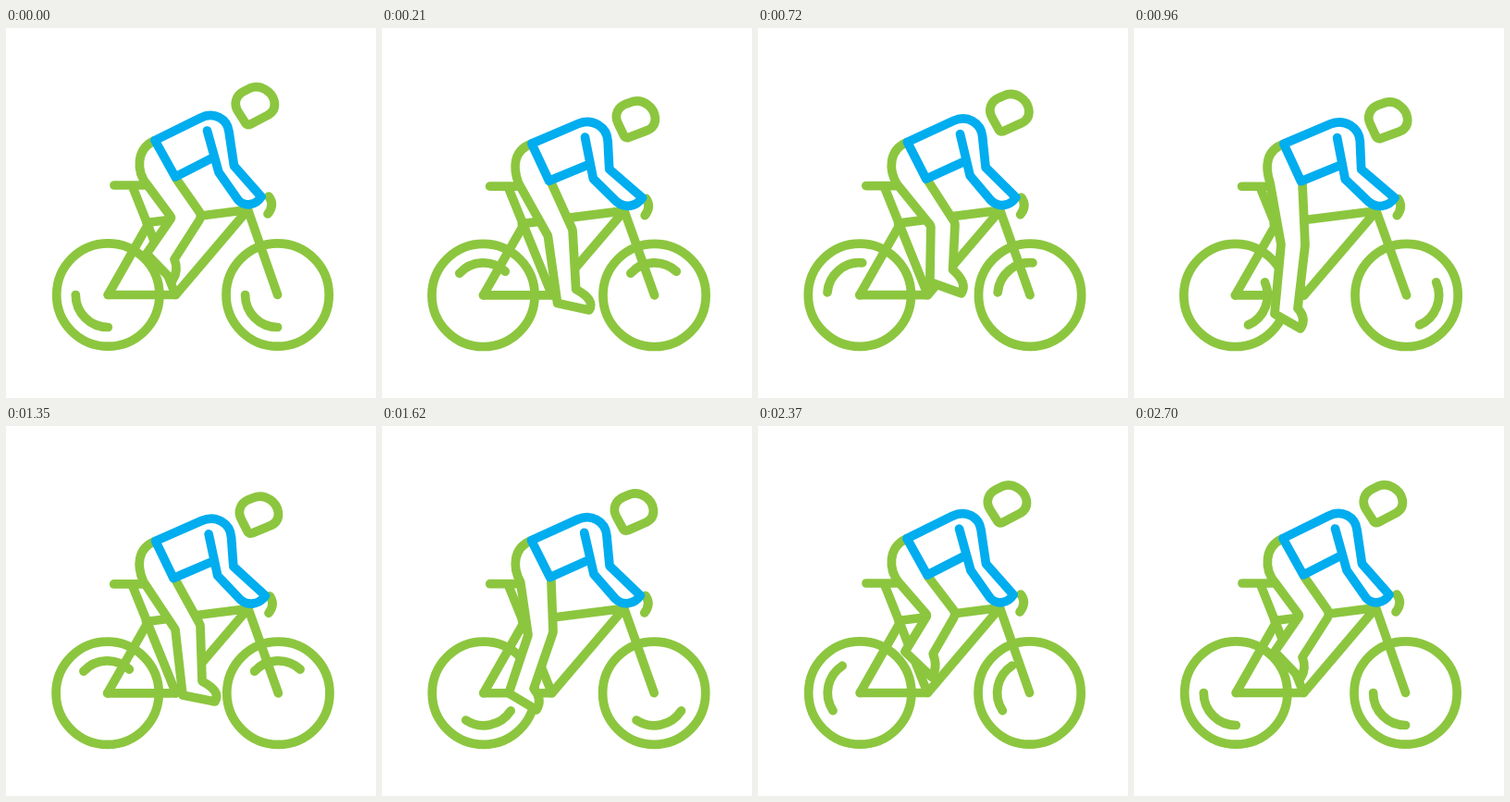
An HTML page with a canvas that plays this animation: 400x400 px, repeating every 2.73 s.

```html
<!DOCTYPE html>
<html lang="en">
<head>
<meta charset="utf-8">
<title>Cyclist</title>
<style>
  html, body { margin: 0; width: 100%; height: 100%; overflow: hidden; background: #fff; }
  canvas { display: block; width: 400px; height: 400px; }
</style>
</head>
<body>
<canvas id="stage" width="400" height="400"></canvas>
<script>
const ctx = document.getElementById('stage').getContext('2d');
const GREEN = '#8cc63f', BLUE = '#00adef';
const STEP = 30, STEPS = 91;
const WHEEL_TURN = 19, PEDAL_TURN = 19.5; // in steps
const TAU = Math.PI * 2;

// Pedal phase, then back knee, heel, toe, instep and front knee as x, y pairs.
const LEG = [
  [0,     179, 205, 152, 244, 180, 273, 182, 250, 212, 203],
  [0.15,  188, 209, 175, 257, 207, 277, 204, 248, 214, 207],
  [0.308, 183, 220, 191, 291, 226, 298, 212, 276, 210, 215],
  [0.538, 164, 240, 173, 312, 203, 327, 193, 300, 189, 230],
  [0.641, 159, 234, 152, 309, 180, 325, 177, 303, 185, 235],
  [0.769, 158, 226, 137, 289, 167, 307, 164, 284, 185, 223]
];

function legKey(i) {
  const n = LEG.length, turn = Math.floor(i / n);
  const key = LEG[i - turn * n];
  return [key[0] + turn, ...key.slice(1)];
}

// Smooth periodic curve through the leg poses.
function legPose(phase) {
  let i = LEG.length - 1;
  while (LEG[i][0] > phase) i--;
  const [k0, k1, k2, k3] = [-1, 0, 1, 2].map(d => legKey(i + d));
  const span = k2[0] - k1[0], u = (phase - k1[0]) / span;
  const u2 = u * u, u3 = u2 * u;
  return k1.slice(1).map((a, j) => {
    const c = j + 1, b = k2[c];
    const m1 = (b - k0[c]) / (k2[0] - k0[0]) * span;
    const m2 = (k3[c] - a) / (k3[0] - k1[0]) * span;
    return (2 * u3 - 3 * u2 + 1) * a + (u3 - 2 * u2 + u) * m1
         + (3 * u2 - 2 * u3) * b + (u3 - u2) * m2;
  });
}

function line(...p) {
  ctx.beginPath();
  ctx.moveTo(p[0], p[1]);
  for (let i = 2; i < p.length; i += 2) ctx.lineTo(p[i], p[i + 1]);
  ctx.stroke();
}

function arc(x, y, r, from, to) {
  ctx.beginPath();
  ctx.arc(x, y, r, from, to);
  ctx.stroke();
}

function drawBike(spin, at) {
  const rear = at(110.3, 288.5, 109.3, 289), front = at(293.6, 288.5, 294.8, 289);
  const crank = at(183.3, 288.5, 184, 289), stem = at(261.5, 196.5, 262, 198);
  ctx.strokeStyle = GREEN;
  for (const hub of [rear, front]) {
    arc(...hub, 55.6, 0, TAU);
    arc(...hub, 35, spin + TAU / 4, spin + TAU / 2);
  }
  line(...at(117, 170, 116.5, 171.5), ...at(149, 170, 148, 171.5));
  line(...at(137, 172, 136.5, 173), ...crank);
  line(...rear, ...at(155, 210, 154, 211));
  line(...rear, ...crank, ...stem, ...at(152, 210.5, 151, 212));
  line(...stem, ...front);
}

function drawLeg(phase, at) {
  const [bx, by, hx, hy, tx, ty, ix, iy, fx, fy] = legPose(phase);
  const thigh = at(184, 163, 181.5, 166);
  ctx.strokeStyle = GREEN;
  ctx.fillStyle = '#fff';
  ctx.beginPath();
  ctx.moveTo(...at(160, 122, 162, 126));
  ctx.bezierCurveTo(...at(141, 131, 142, 133), ...at(140, 155, 142, 150), ...at(153, 170, 146, 167));
  ctx.arcTo(bx, by, hx, hy, 3);
  ctx.lineTo(hx, hy);
  ctx.lineTo(tx, ty);
  ctx.quadraticCurveTo(tx + 7, ty - 11, ix, iy);
  ctx.arcTo(fx, fy, ...thigh, 8);
  ctx.lineTo(...thigh);
  ctx.fill();
  ctx.stroke();
}

function drawGrip(at) {
  ctx.beginPath();
  ctx.moveTo(...at(284, 182, 286, 185));
  ctx.quadraticCurveTo(...at(291, 191, 291.5, 194), ...at(283, 201, 284.5, 203));
  ctx.stroke();
}

function drawHead(lean, at) {
  ctx.save();
  ctx.translate(...at(269, 83, 275.3, 102));
  ctx.rotate(lean * 0.155);
  ctx.beginPath();
  ctx.moveTo(-10, 20);
  ctx.lineTo(-18, 7.5);
  ctx.bezierCurveTo(-23.5, -1, -20.5, -10, -12, -14.5);
  ctx.lineTo(-5, -18);
  ctx.bezierCurveTo(6, -22.5, 18.5, -14.5, 21, -4);
  ctx.bezierCurveTo(22.5, 3, 19.5, 8, 14.5, 11);
  ctx.lineTo(-4.5, 21);
  ctx.quadraticCurveTo(-8, 22.5, -10, 20);
  ctx.closePath();
  ctx.stroke();
  ctx.restore();
}

function drawTorso(at) {
  ctx.strokeStyle = BLUE;
  ctx.beginPath();
  ctx.moveTo(...at(222, 141, 225, 149));
  ctx.lineTo(...at(183, 161, 180, 166.5));
  ctx.lineTo(...at(161, 121.5, 162, 126));
  ctx.lineTo(...at(210, 97.3, 213, 105));
  ctx.bezierCurveTo(...at(225, 90, 228, 99), ...at(239, 98, 244.5, 109), ...at(241, 112, 245, 125));
  ctx.lineTo(...at(246.5, 149, 245.5, 153.5));
  ctx.lineTo(...at(276, 182.5, 283, 184));
  ctx.bezierCurveTo(...at(270, 192, 276, 193.5), ...at(258, 193.5, 264, 196), ...at(251, 186, 254, 188));
  ctx.lineTo(...at(230, 156, 228, 165));
  ctx.lineTo(...at(217.5, 111, 220, 120));
  ctx.stroke();
}

function draw(step) {
  const spin = step / WHEEL_TURN * TAU;
  const phase = step / PEDAL_TURN % 1;
  const lean = step ? 0.5 - 0.5 * Math.cos(TAU * (phase - 0.012)) : 0;
  const at = (x0, y0, x1, y1) => [x0 + (x1 - x0) * lean, y0 + (y1 - y0) * lean];

  ctx.fillStyle = '#fff';
  ctx.fillRect(0, 0, 400, 400);
  ctx.lineWidth = 9.7;
  ctx.lineCap = ctx.lineJoin = 'round';
  drawBike(spin, at);
  drawLeg(phase, at);
  drawGrip(at);
  drawHead(lean, at);
  drawTorso(at);
}

const start = performance.now();
function tick() {
  const step = Math.floor((performance.now() - start) / STEP) % STEPS;
  draw(step % (STEPS - 1)); // the last step rests on the opening pose
  requestAnimationFrame(tick);
}
tick();
</script>
</body>
</html>
```
